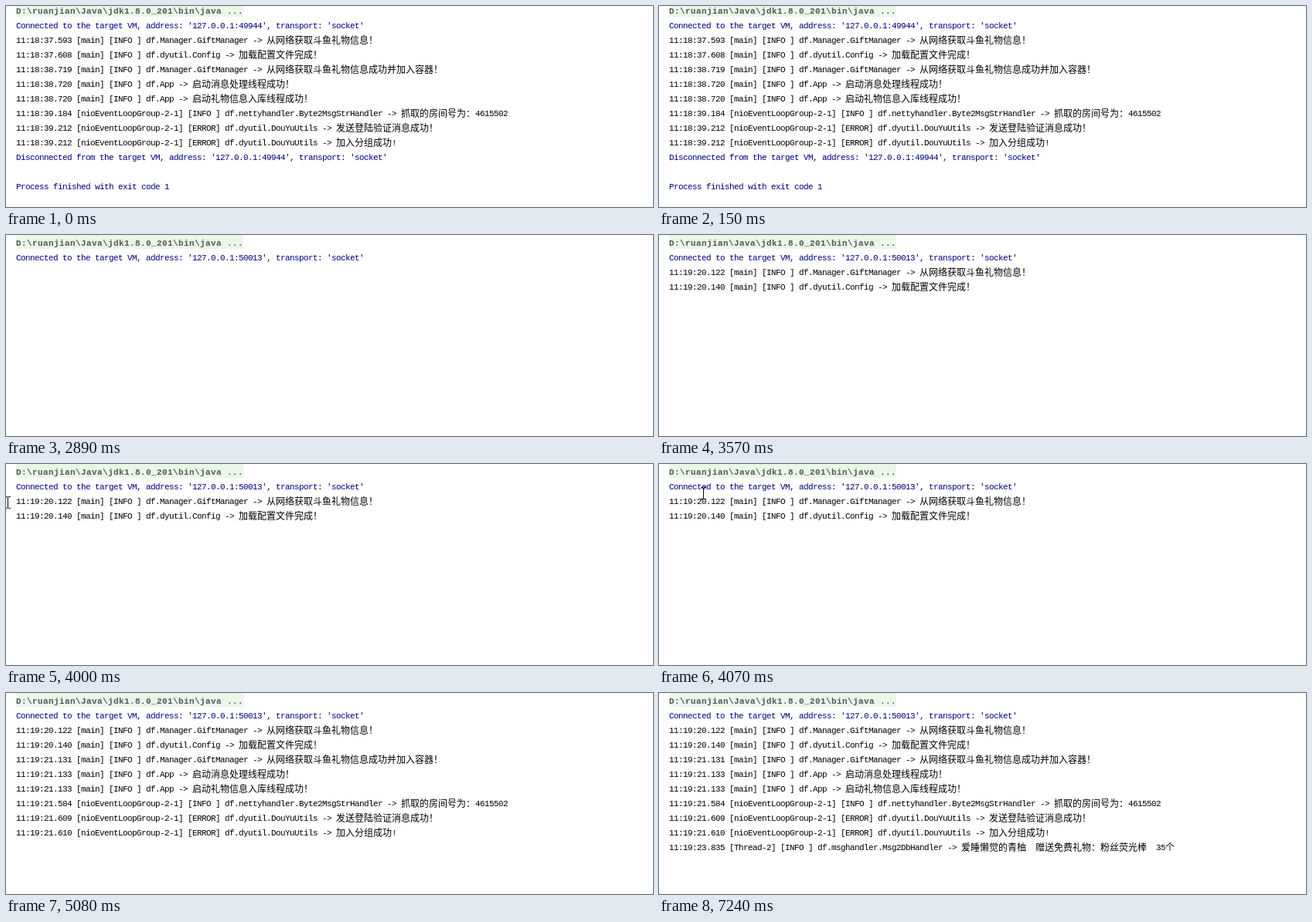
An HTML page that plays this animation: 837 px wide and 261 px high, repeating every 8 s.

```html
<!DOCTYPE html>
<html lang="zh-CN">
<head>
<meta charset="utf-8">
<title>Console</title>
<style>
  html, body { margin: 0; width: 100%; height: 100%; overflow: hidden; background: #fff; }
  svg { display: block; width: 837px; height: 261px; }
  text { white-space: pre; fill: #000; }
  .latin { font: 11px "Liberation Mono", monospace; letter-spacing: -0.6px; }
  .cjk { font: 12px "Noto Sans CJK SC", "Noto Sans CJK", sans-serif; }
  .cmd { font: bold 11px "Liberation Mono", monospace; letter-spacing: 0.4px; fill: #555; }
  .sys { fill: #000080; }
</style>
</head>
<body>
<svg id="stage" viewBox="0 0 837 261">
  <g id="head">
    <rect x="13" y="0" width="294" height="18" fill="#eaf6e8"/>
    <text class="cmd" x="13" y="14">D:\ruanjian\Java\jdk1.8.0_201\bin\java ...</text>
  </g>
  <path id="caret" d="M-3 .5H0M1 .5H4M.5 1V15M-3 15.5H0M1 15.5H4" fill="none" stroke="#000" shape-rendering="crispEdges"/>
</svg>
<script>
const LOOP = 8000, LEFT = 13, CELL = 6, BASE = 14, PITCH = 19, SCROLL = -4;
const stage = document.getElementById('stage');
const head = document.getElementById('head');
const caret = document.getElementById('caret');

const connected = port =>
  `Connected to the target VM, address: '127.0.0.1:${port}', transport: 'socket'`;
const loop = '[nioEventLoopGroup-2-1]';

// The eight log lines both runs share, given their time stamps
const log = stamps => [
  '[main] [INFO ] df.Manager.GiftManager -> 从网络获取斗鱼礼物信息!',
  '[main] [INFO ] df.dyutil.Config -> 加载配置文件完成!',
  '[main] [INFO ] df.Manager.GiftManager -> 从网络获取斗鱼礼物信息成功并加入容器!',
  '[main] [INFO ] df.App -> 启动消息处理线程成功!',
  '[main] [INFO ] df.App -> 启动礼物信息入库线程成功!',
  loop + ' [INFO ] df.nettyhandler.Byte2MsgStrHandler -> 抓取的房间号为:4615502',
  loop + ' [ERROR] df.dyutil.DouYuUtils -> 发送登陆验证消息成功!',
  loop + ' [ERROR] df.dyutil.DouYuUtils -> 加入分组成功!'
].map((line, i) => {
  const full = i === 7 ? line : line.replace('!', '\uff01');
  return `11:${stamps[i]} ${full.replace('为:', '为\uff1a')}`;
});

const oldRun = [
  connected(49944),
  ...log(['18:37.593', '18:37.608', '18:38.719', '18:38.720', '18:38.720',
          '18:39.184', '18:39.212', '18:39.212']),
  "Disconnected from the target VM, address: '127.0.0.1:49944', transport: 'socket'",
  '',
  'Process finished with exit code 1'
];
const newRun = [
  connected(50013),
  ...log(['19:20.122', '19:20.140', '19:21.131', '19:21.133', '19:21.133',
          '19:21.584', '19:21.609', '19:21.610']),
  '11:19:23.835 [Thread-2] [INFO ] df.msghandler.Msg2DbHandler -> ' +
  '爱睡懒觉的青柚  赠送免费礼物\uff1a粉丝荧光棒  35个'
];

// [time, rows of the new run on screen]
const reveals = [[2890, 1], [3570, 3], [4600, 6], [5080, 9], [7240, 10]];
const sweep = [4000, 4070, 4160, 4230, 4310, 4380, 4450, 4520, 4600];

function make(tag, attrs, parent) {
  const el = document.createElementNS('http://www.w3.org/2000/svg', tag);
  for (const k in attrs) el.setAttribute(k, attrs[k]);
  return parent.appendChild(el);
}

// Latin takes one cell per character, CJK two
function addRow(parent, line, i) {
  const row = make('g', {}, parent);
  const y = BASE + PITCH * (i + 1);
  const tone = /^\d/.test(line) ? '' : ' sys';
  let x = LEFT;
  for (const run of line.match(/[\x00-\x7f]+|[^\x00-\x7f]+/g) || []) {
    const wide = run.charCodeAt(0) > 127;
    const el = make('text', { x, y: wide ? y + 0.5 : y, class: (wide ? 'cjk' : 'latin') + tone }, row);
    el.textContent = run;
    x += run.length * CELL * (wide ? 2 : 1);
  }
  return row;
}

const oldGroup = make('g', { transform: `translate(0 ${SCROLL})` }, stage);
oldRun.forEach((line, i) => addRow(oldGroup, line, i));
const newGroup = make('g', {}, stage);
const newRows = newRun.map((line, i) => addRow(newGroup, line, i));
stage.appendChild(caret);

const show = (el, on) => el.setAttribute('visibility', on ? 'visible' : 'hidden');

function caretAt(t) {
  if (t >= 70 && t < 150) return [718, 111];
  if (t < 4000 || t >= 4670) return null;
  const p = sweep.filter(s => s <= t).length - 1;
  const u = p / (sweep.length - 1);
  return [Math.round(2 + 832 * u ** 1.306), Math.round(7 + 35 * (1 - u) ** 3)];
}

function draw() {
  const t = performance.now() % LOOP;
  const first = t < 2560;
  head.setAttribute('transform', `translate(0 ${first ? SCROLL : 0})`);
  show(oldGroup, first);
  const count = reveals.reduce((n, [at, rows]) => t >= at ? rows : n, 0);
  newRows.forEach((row, i) => show(row, i < count));
  const pos = caretAt(t);
  show(caret, pos);
  if (pos) caret.setAttribute('transform', `translate(${pos})`);
  requestAnimationFrame(draw);
}
draw();
</script>
</body>
</html>
```
